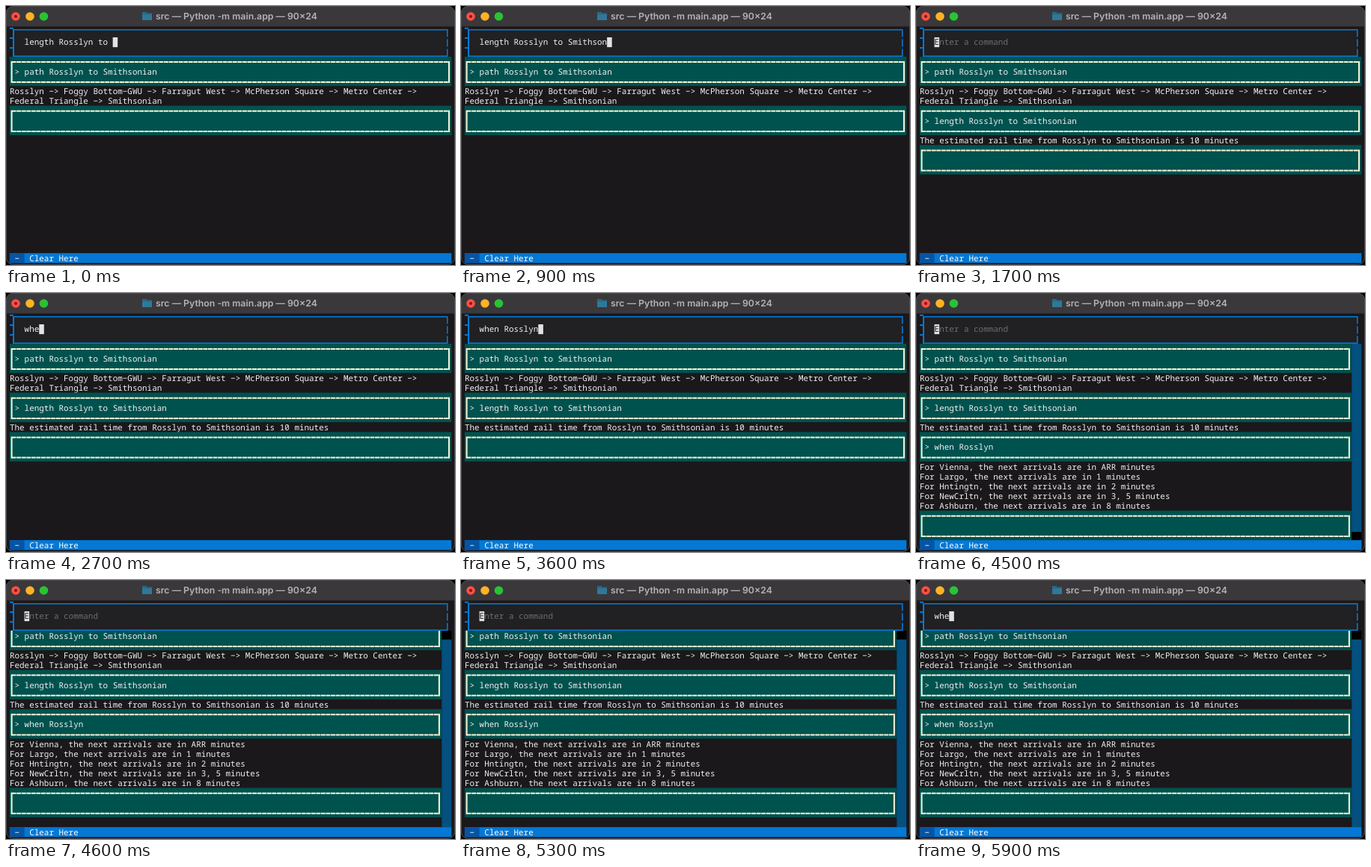
Animation of 600 by 347 pixels, one loop 6 s. Source, as an HTML page with a canvas:

```html
<!DOCTYPE html>
<html lang="en">
<head>
<meta charset="utf-8">
<title>Terminal session</title>
<style>
  html, body { margin: 0; width: 100%; height: 100%; overflow: hidden; background: #000; }
  canvas { display: block; }
</style>
</head>
<body>
<canvas id="stage" width="600" height="347"></canvas>
<script>
const ctx = document.getElementById('stage').getContext('2d');
ctx.textRendering = 'geometricPrecision';
const LOOP = 6000, TICK = 100;
const LEFT = 4.9, TOP = 28.2, CELL = 6.56, ROW = 13.17;
const COLS = 90, FIRST_ROW = 3, FOOTER_ROW = 23;
const MONO = '10.93px "Noto Sans Mono", "DejaVu Sans Mono", monospace';
const COLOR = {
  back: '#1a181b', bar: '#3a383b', field: '#212022', blue: '#0478d4', key: '#0654a5',
  teal: '#00524f', cream: '#f6f6d8', text: '#f0f0f0', hint: '#6d6c6e', thumb: '#04507f'
};

const PATH = [
  { command: 'path Rosslyn to Smithsonian' },
  { lines: ['Rosslyn -> Foggy Bottom-GWU -> Farragut West -> McPherson Square -> Metro Center ->',
            'Federal Triangle -> Smithsonian'] }
];
const LENGTH = [
  { command: 'length Rosslyn to Smithsonian' },
  { lines: ['The estimated rail time from Rosslyn to Smithsonian is 10 minutes'] }
];
const WHEN = [
  { command: 'when Rosslyn' },
  { lines: [['Vienna', 'ARR'], ['Largo', '1'], ['Hntingtn', '2'], ['NewCrltn', '3, 5'], ['Ashburn', '8']]
      .map(([line, wait]) => `For ${line}, the next arrivals are in ${wait} minutes`) }
];
const LENGTH_SENT = 1600, WHEN_SENT = 4500, SCROLLED = 4600;

const colX = col => LEFT + col * CELL;
const rowY = row => TOP + row * ROW;

function rect(x, y, w, h, color) {
  ctx.fillStyle = color;
  ctx.fillRect(x, y, w, h);
}

function disc(x, y, r, color) {
  ctx.fillStyle = color;
  ctx.beginPath();
  ctx.arc(x, y, r, 0, Math.PI * 2);
  ctx.fill();
}

// One glyph per terminal cell; hyphens use the wide minus form.
function print(text, col, row, color = COLOR.text) {
  ctx.font = `500 ${MONO}`;
  ctx.fillStyle = color;
  [...text.replaceAll('-', '\u2212')].forEach((char, i) =>
    ctx.fillText(char, colX(col + i), rowY(row) + 11));
}

function typed(text, start, step, t) {
  return text.slice(0, Math.max(0, Math.floor((t - start) / step)));
}

function inputAt(t) {
  if (t < LENGTH_SENT) return 'length Rosslyn to ' + typed('Smithsonian', 0, 110, t);
  if (t < WHEN_SENT) return typed('when Rosslyn', 2400, 100, t);
  return typed('whe', 5600, 100, t);
}

function drawWindow() {
  rect(0, 0, 600, 347, '#000');
  ctx.beginPath();
  ctx.roundRect(0, 0, 600, 347, 9);
  ctx.fillStyle = COLOR.back;
  ctx.fill();
  ctx.save();
  ctx.clip();
  rect(0, 0, 600, 27.4, COLOR.bar);
  ctx.restore();
  ctx.beginPath();
  ctx.roundRect(0.5, 0.5, 599, 346, 9);
  ctx.strokeStyle = '#4a484b';
  ctx.lineWidth = 1;
  ctx.stroke();

  disc(13, 14, 5.8, '#ff4f45');
  disc(13, 14, 2, '#7d1712');
  disc(32, 14, 5.8, '#fdb324');
  disc(50.5, 14, 5.8, '#28c435');

  rect(182, 8, 6, 3, '#276a86');
  rect(182, 9.5, 13, 9.5, '#276a86');
  rect(182, 11.5, 13, 7.5, '#30789a');
  ctx.font = '600 12.3px Inter, Roboto, sans-serif';
  ctx.fillStyle = '#b5b3b6';
  ctx.fillText('src \u2014 Python -m main.app \u2014 90\u00d724', 200, 18.4);
}

function drawInput(value) {
  rect(10, 31, 580, 36, COLOR.field);
  rect(9, 31, 2, 37, COLOR.blue);
  rect(9, 31, 581, 1.6, COLOR.blue);
  rect(9, 66.4, 581, 1.6, COLOR.blue);
  for (let row = 0; row < 3; row++) {
    rect(5, rowY(row) + 0.6, 5, 2, COLOR.blue);
    rect(589, rowY(row) + 3, 1.6, ROW - 3, COLOR.blue);
  }
  const cursor = 3 + value.length;
  print(value || 'Enter a command', 3, 1, value ? COLOR.text : COLOR.hint);
  rect(colX(cursor), rowY(1) + 0.6, CELL, ROW, '#e2e2e2');
  if (!value) print('E', 3, 1, COLOR.field);
}

function drawFrame(x, y, w, h) {
  ctx.strokeStyle = COLOR.cream;
  ctx.lineWidth = 2;
  ctx.beginPath();
  for (const side of [x, x + w]) {
    ctx.moveTo(side, y - 1);
    ctx.lineTo(side, y + h + 1);
  }
  ctx.stroke();
  // Box-drawing glyphs leave a faint seam between cells.
  ctx.setLineDash([CELL - 0.6, 0.6]);
  ctx.beginPath();
  for (const edge of [y, y + h]) {
    ctx.moveTo(x, edge);
    ctx.lineTo(x + w, edge);
  }
  ctx.stroke();
  ctx.setLineDash([]);
}

function drawCommand(command, row, cols) {
  rect(colX(0), rowY(row), cols * CELL, 3 * ROW, COLOR.teal);
  drawFrame(7.6, rowY(row) + 7.2, colX(cols) - 10.9, 2 * ROW + 0.8);
  if (command) print('> ' + command, 1, row + 1);
}

function drawLog(t) {
  const overflow = t >= WHEN_SENT, scrolled = t >= SCROLLED;
  const cols = overflow ? COLS - 2 : COLS;
  const entries = [...PATH, ...(t >= LENGTH_SENT ? LENGTH : []), ...(overflow ? WHEN : []), { command: '' }];
  const top = rowY(FIRST_ROW), height = rowY(FOOTER_ROW) - top;

  ctx.save();
  ctx.beginPath();
  ctx.rect(0, top, 600, height);
  ctx.clip();
  let row = FIRST_ROW - (scrolled ? 1 : 0);
  for (const { command, lines } of entries) {
    if (lines) lines.forEach(line => print(line, 0, row++));
    else {
      drawCommand(command, row, cols);
      row += 3;
    }
  }
  if (overflow) {
    const gap = 11;
    rect(colX(cols), top, 2 * CELL, height, '#000');
    rect(colX(cols), top + (scrolled ? gap + 1 : 0), 2 * CELL, height - gap, COLOR.thumb);
  }
  ctx.restore();
}

function drawFooter() {
  const y = rowY(FOOTER_ROW);
  rect(colX(0), y, COLS * CELL, ROW, COLOR.blue);
  rect(colX(0), y, 3 * CELL, ROW, COLOR.key);
  print('-', 1, FOOTER_ROW, '#fff');
  print('Clear Here', 4, FOOTER_ROW, '#fff');
}

function frame(now) {
  const t = Math.floor((now % LOOP) / TICK) * TICK;
  drawWindow();
  drawLog(t);
  drawInput(inputAt(t));
  drawFooter();
  requestAnimationFrame(frame);
}

frame(0);
</script>
</body>
</html>
```
